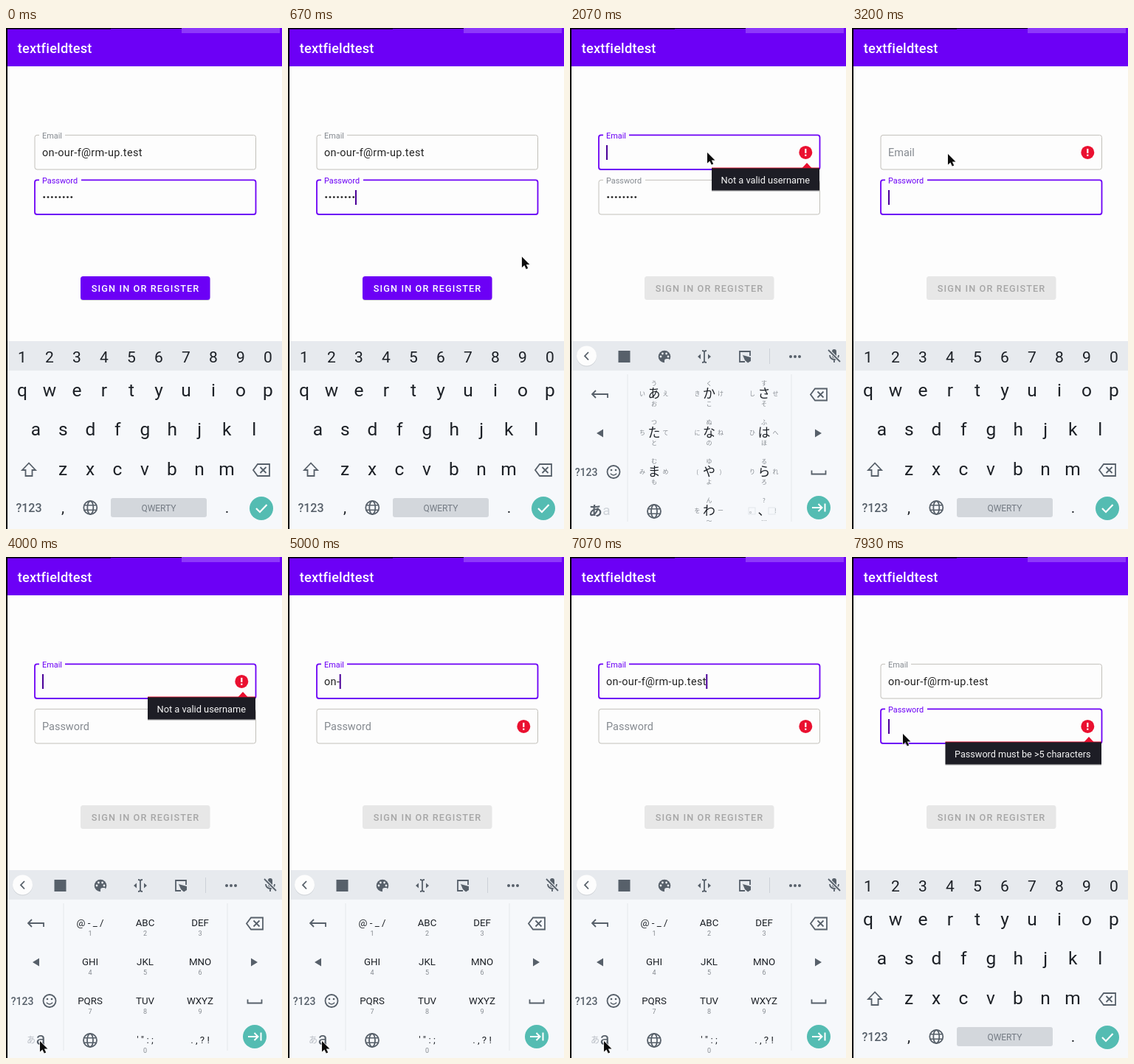
Recreate the animation shown at these times as an HTML page. Size 374 by 680 pixels, loop 8 s.

```html
<!DOCTYPE html>
<html lang="en">
<head>
<meta charset="utf-8">
<title>Sign-in form</title>
<style>
html, body { margin: 0; width: 100%; height: 100%; overflow: hidden; background: #fdfdfd; }
svg { display: block; width: 100vw; height: 100vh; font-family: Roboto, sans-serif; }
.jp { font-family: "Noto Sans CJK JP", "Noto Sans CJK", sans-serif; }
.mid { text-anchor: middle; }
.line { fill: none; stroke: #57606a; stroke-width: 1.8; }
.value { font-size: 14.48px; letter-spacing: .33px; fill: #222; }
</style>
</head>
<body>
<svg id="stage" viewBox="0 0 374 680"></svg>
<script>
const INK = '#1c2026', ICON = '#57606a', FAINT = '#858a90', PAGE = '#fdfdfd';
const PURPLE = '#6c00f6', RED = '#ea1030', TEAL = '#54bcb2';
const STRIP = '#e7eaee', OFF = '#e7e7e7', MARK = '#a8f0cc';
const EMAIL = 'on-our-f@rm-up.test';
const LOOP = 8000;

// ---- markup helpers ----
const rect = (x, y, w, h, fill, more = '') =>
  `<rect x="${x}" y="${y}" width="${w}" height="${h}" fill="${fill}" ${more}/>`;
const disc = (x, y, r, fill, more = '') =>
  `<circle cx="${x}" cy="${y}" r="${r}" fill="${fill}" ${more}/>`;
const text = (s, x, y, size, fill, more = '') =>
  `<text x="${x}" y="${y}" font-size="${size}" fill="${fill}" ${more}>${s}</text>`;
const mid = (s, x, y, size, fill = INK, cls = '', more = '') =>
  text(s, x, y, size, fill, `class="mid ${cls}" ${more}`);
const line = (d, more = '') => `<path class="line" d="${d}" ${more}/>`;
const solid = (d, fill = ICON) => `<path d="${d}" fill="${fill}"/>`;
const at = (x, y, body) => `<g transform="translate(${x} ${y})">${body}</g>`;
const group = (id, body) => `<g id="${id}">${body}</g>`;

// ---- icons ----
const backspace = line('M-5-8H11V8H-5L-11 0ZM-1.5-4L6.5 4M6.5-4L-1.5 4');
const globe = line('M-8.2-3.2H8.2M-8.2 3.2H8.2', 'style="stroke-width:1.4"') +
  '<circle class="line" r="9"/><ellipse class="line" rx="4" ry="9"/>';
const smiley = '<circle class="line" r="8.5"/>' + disc(-3, -2.5, 1.3, ICON) + disc(3, -2.5, 1.3, ICON) +
  line('M-4.2 2.2Q0 6.6 4.2 2.2', 'style="stroke-width:1.5"');
const palette = disc(0, 0, 8.3, ICON) +
  [[-5, 0], [-2.6, -4], [2.6, -4], [5, 0]].map(p => disc(...p, 1.4, STRIP)).join('') +
  solid('M0 9V5.5Q0 3 3 3H6L9 9Z', STRIP);
const beam = line('M-3-8Q0-8 0-6Q0-8 3-8M0-6V6M-3 8Q0 8 0 6Q0 8 3 8') +
  solid('M-9 0L-5-3.5V3.5ZM9 0L5-3.5V3.5Z');
const sticker = line('M7-1V-7H-7V7H0') + solid('M-3-2L8 1V6L4 8.5L0 5Z');
const micOff = solid('M-3-6A3 3 0 0 1 3-6V0A3 3 0 0 1-3 0Z') +
  line('M-6-1A6 6 0 0 0 6-1M0 5V9') +
  line('M-8-8L8 8', `style="stroke:${STRIP};stroke-width:4"`) + line('M-8-8L8 8');
const alert = disc(0, 0, 9, RED) + rect(-1.1, -5, 2.2, 6, '#fff') + rect(-1.1, 2.7, 2.2, 2.2, '#fff');

// ---- form ----
function field(id, top, label) {
  return rect(39, top, 299.5, 46.6, 'none', `id="${id}Box" rx="3"`) +
    rect(45, top - 3, 0, 6, PAGE, `id="${id}Gap"`) +
    text(label, 49, 0, 10.9, FAINT, `id="${id}Label"`) +
    group(id + 'Alert', at(319.3, top + 23.5, alert));
}
function tip(id, x, y, s, size) {
  return group(id, rect(x, y + 2, 338 - x, 30, '#999', 'opacity=".5"') +
    rect(x, y - .5, 338 - x, 1.5, RED) + rect(x, y + .3, 338 - x, 30.2, '#1d1d25') +
    solid(`M314.5 ${y}L321 ${y - 7}L327.5 ${y}Z`, RED) +
    text(s, x + 12.5, y + 21, size, '#f6f6f6'));
}
const dots = [...Array(8).keys()].map(i => disc(51.7 + i * 5.3, 229.6, 1.4, '#222')).join('');
const form =
  rect(0, 0, 374, 680, PAGE) +
  rect(0, 0, 374, 52, PURPLE) + rect(0, 0, 240, 1, '#000') + rect(0, 0, 142, 1.6, '#000') +
  rect(238, 0, 133, 7, '#8d38fa') +
  text('textfieldtest', 15.7, 34, 18.2, '#fff', 'font-weight="500" letter-spacing=".22"') +
  field('mail', 145.4, 'Email') + field('pass', 206.4, 'Password') +
  rect(49, 159, 135.5, 20, MARK, 'id="mailSel"') +
  rect(49, 220, 43, 20, MARK, 'id="passSel"') +
  '<text id="mailText" class="value" x="49" y="174.3"></text>' +
  group('passText', dots) +
  rect(0, 0, 2, 20, '#4a0098', 'id="caret"') +
  rect(101, 338, 175.5, 32, '#bbb', 'id="shade" rx="3.5" opacity=".6"') +
  rect(101, 337, 175.5, 32, PURPLE, 'id="button" rx="3.5"') +
  text('SIGN IN OR REGISTER', 115.8, 357.7, 12.67, '#fff',
    'id="caption" font-weight="500" letter-spacing="1.13"') +
  tip('mailTip', 192, 190, 'Not a valid username', 12.8) +
  tip('passTip', 126.5, 251, 'Password must be &gt;5 characters', 12.67);

// ---- keyboards ----
const row = (s, x, y, size) => [...s].map((c, i) => mid(c, x + i * 37, y, size)).join('');
const base = rect(0, 425, 374, 255, '#f6f8fb') + rect(0, 425, 374, 40, STRIP);
const qwerty = row('1234567890', 22, 454, 21) + row('qwertyuiop', 22, 500, 24.5) +
  row('asdfghjkl', 40.3, 553, 24.5) + row('zxcvbnm', 77, 607, 24.5) +
  line('M31 590.5L22 600H26.5V608H35.5V600H40Z') + at(346, 600, backspace) +
  mid('?123', 31, 657, 16, ICON, '', 'font-weight="500"') +
  mid(',', 77, 658, 21) + mid('.', 299.5, 658, 21) + at(114.3, 651, globe) +
  rect(142, 638, 130, 26, '#d3d7dc', 'rx="3"') + mid('QWERTY', 207, 656, 12, '#747b84') +
  disc(346, 652, 16, TEAL) + line('M339 652L344 657L353.5 647', 'style="stroke:#fff;stroke-width:2.2"');

const cols = [114, 188.5, 263];
const rowY = r => 497 + r * 53;
const pad =
  disc(22.5, 446, 13.5, '#cdd1d6') + disc(22.5, 445, 13.5, PAGE) + line('M25 440L20 445.2L25 450.5') +
  rect(65.5, 438, 16, 16, ICON) +
  at(128, 446, palette) + at(182, 446, beam) + at(237, 446, sticker) +
  rect(270, 435, 1, 21, '#cdd1d8') +
  [299, 305, 311].map(x => disc(x, 446, 2, ICON)).join('') + at(358, 445, micOff) +
  [77.5, 299.5].map(x => rect(x, 470, 1, 200, '#e4e7ec')).join('') +
  at(40, 497, line('M11 5V0H-10M-5-5L-10 0L-5 5')) +
  solid('M36 550L45 544.5V555.5Z') + solid('M341 550L332 544.5V555.5Z') +
  mid('?123', 22, 608, 14, ICON, '', 'font-weight="500"') + at(59, 602.5, smiley) +
  at(114, 656, globe) + at(337, 497.5, backspace) + at(337, 602.5, line('M-9.5-2V3H9.5V-2')) +
  disc(337, 651, 16, TEAL) +
  line('M328 651H341M336.5 646L341.5 651L336.5 656M345.5 645.5V656.5', 'style="stroke:#fff;stroke-width:2"');

// centre, left, top, right, bottom
const kanaKeys = [['あいうえお', 'かきくけこ', 'さしすせそ'], ['たちつてと', 'なにぬねの', 'はひふへほ'],
  ['まみむめも', 'や(ゆ)よ', 'らりるれろ'], ['', 'わをんー〜', '、。?!…']];
const spots = [[0, 6, 17], [-16, 3, 8], [0, -11, 8], [15.5, 3, 8], [0, 17, 8]];
const kana = kanaKeys.map((keys, r) => keys.map((key, c) => [...key].map((ch, i) => {
  const [dx, dy, size] = spots[i];
  return mid(ch, cols[c] + dx, rowY(r) + dy - 1, size, i ? FAINT : INK, 'jp', i ? '' : 'font-weight="500"');
}).join('')).join('')).join('') +
  mid('あ', 34.5, 661.5, 18.5, ICON, 'jp', 'font-weight="700"') + mid('a', 49.5, 661, 19, '#cdd2d8') +
  [242, 269].map(x => rect(x, 651, 9, 9, 'none', 'stroke="#dde0e6" stroke-width=".8"')).join('');

const latinKeys = [['@ - _ /', 'ABC', 'DEF'], ['GHI', 'JKL', 'MNO'], ['PQRS', 'TUV', 'WXYZ'],
  ['', '\' " : ;', '. , ? !']];
const latin = latinKeys.map((keys, r) => keys.map((key, c) => {
  const digit = r < 3 ? r * 3 + c + 1 : c === 1 ? 0 : '';
  return mid(key, cols[c], rowY(r) + 4.3, 13.3) + mid(digit, cols[c], rowY(r) + 17, 9, FAINT);
}).join('')).join('') +
  mid('あ', 34, 660, 12, '#b9bec5', 'jp') + mid('a', 47, 662, 24, ICON);

const pointer = '<path d="M0 1V15.5L3.4 12.4L5.8 17.6L8.2 16.5L5.8 11.4H10.4Z" fill="#0c0c0c"' +
  ' stroke="#f4f4f4" stroke-width="1.4" paint-order="stroke"/>';

const $ = id => document.getElementById(id);
$('stage').innerHTML = form + base + group('qwerty', qwerty) +
  group('pad', pad + group('kana', kana) + group('latin', latin)) +
  rect(0, 0, 2, 680, '#000') + group('mouse', pointer);

// ---- timeline ----
const typed = [4390, 4590, 4860, 5120, 5190, 5190, 5260, 5260, 5460, 5590, 5720, 5860,
  6060, 6120, 6320, 6460, 6590, 6720, 6920];
const resets = [190, 1590, 2470, 2860, 3400, 3530, ...typed, 7730];
// time, x, y
const path = [[400, 374, 380], [1100, 203, 169], [1930, 203, 169], [2070, 186, 168], [2430, 92, 226],
  [2730, 70, 228], [2900, 70, 228], [3190, 130, 170], [3400, 130, 170], [3730, 46, 656],
  [7270, 46, 656], [7690, 69, 239], [LOOP, 69, 239]];

const within = (t, a, b) => t >= a && t < b;
const ease = p => p * p * (3 - 2 * p);
const ramp = (t, start) => ease(Math.min(1, Math.max(0, (t - start) / 170)));
const show = (id, on) => $(id).setAttribute('visibility', on ? 'inherit' : 'hidden');
const set = (id, attrs) => {
  for (const k in attrs) $(id).setAttribute(k, attrs[k]);
};

function mouseAt(t) {
  const i = path.findIndex(p => p[0] > t);
  const [t0, x0, y0] = path[i - 1], [t1, x1, y1] = path[i];
  const e = ease((t - t0) / (t1 - t0));
  return [x0 + (x1 - x0) * e, y0 + (y1 - y0) * e];
}

function drawField(id, top, focused, up, gap) {
  set(id + 'Box', { stroke: focused ? PURPLE : '#c2c0ba', 'stroke-width': focused ? 1.8 : 1 });
  set(id + 'Gap', { width: gap * up });
  set(id + 'Label', { y: top + 28.3 - 24.2 * up, 'font-size': 14.48 - 3.6 * up,
    fill: focused ? PURPLE : FAINT });
}

function draw(t) {
  const onMail = within(t, 1200, 2470) || within(t, 3400, 7730);
  const count = typed.filter(x => x <= t).length;
  const mail = t < 1590 ? EMAIL : EMAIL.slice(0, count);
  const passFull = t < 2860;
  const badMail = within(t, 1590, typed[0]) || within(t, typed[8], typed[15]);

  drawField('mail', 145.4, onMail, 1 - ramp(t, 2470) + ramp(t, 3400), 35);
  drawField('pass', 206.4, !onMail, 1 - ramp(t, 3400) + ramp(t, 7730), 57);
  $('mailText').textContent = mail;
  show('passText', passFull);
  const mailSel = within(t, 1320, 1590), passSel = within(t, 2660, 2860);
  show('mailSel', mailSel);
  show('passSel', passSel);
  show('mailAlert', badMail);
  show('passAlert', t >= typed[0]);
  show('mailTip', badMail && onMail && !within(t, 3400, 3460));
  show('passTip', t >= 7860);

  const last = Math.max(-500, ...resets.filter(x => x <= t));
  const lit = Math.floor((t - last) / 500) % 2 === 0;
  show('caret', lit && t >= resets[0] && !mailSel && !passSel);
  const width = onMail ? (mail ? $('mailText').getComputedTextLength() - .5 : 0) : passFull ? 42 : 0;
  set('caret', { x: 49 + width, y: onMail ? 159 : 220 });

  const ready = t < 1590;
  show('shade', ready);
  set('button', { fill: ready ? PURPLE : OFF });
  set('caption', { fill: ready ? '#fff' : '#a6a6a6' });

  const isKana = within(t, 1400, 2600) || within(t, 3460, 3860);
  const isLatin = within(t, 3860, 7790);
  show('qwerty', !isKana && !isLatin);
  show('pad', isKana || isLatin);
  show('kana', isKana);
  show('latin', isLatin);

  show('mouse', t >= 400);
  if (t >= 400) set('mouse', { transform: `translate(${mouseAt(t).join(' ')})` });
}

const began = performance.now();
function tick() {
  draw((performance.now() - began) % LOOP);
  requestAnimationFrame(tick);
}
tick();
</script>
</body>
</html>
```
